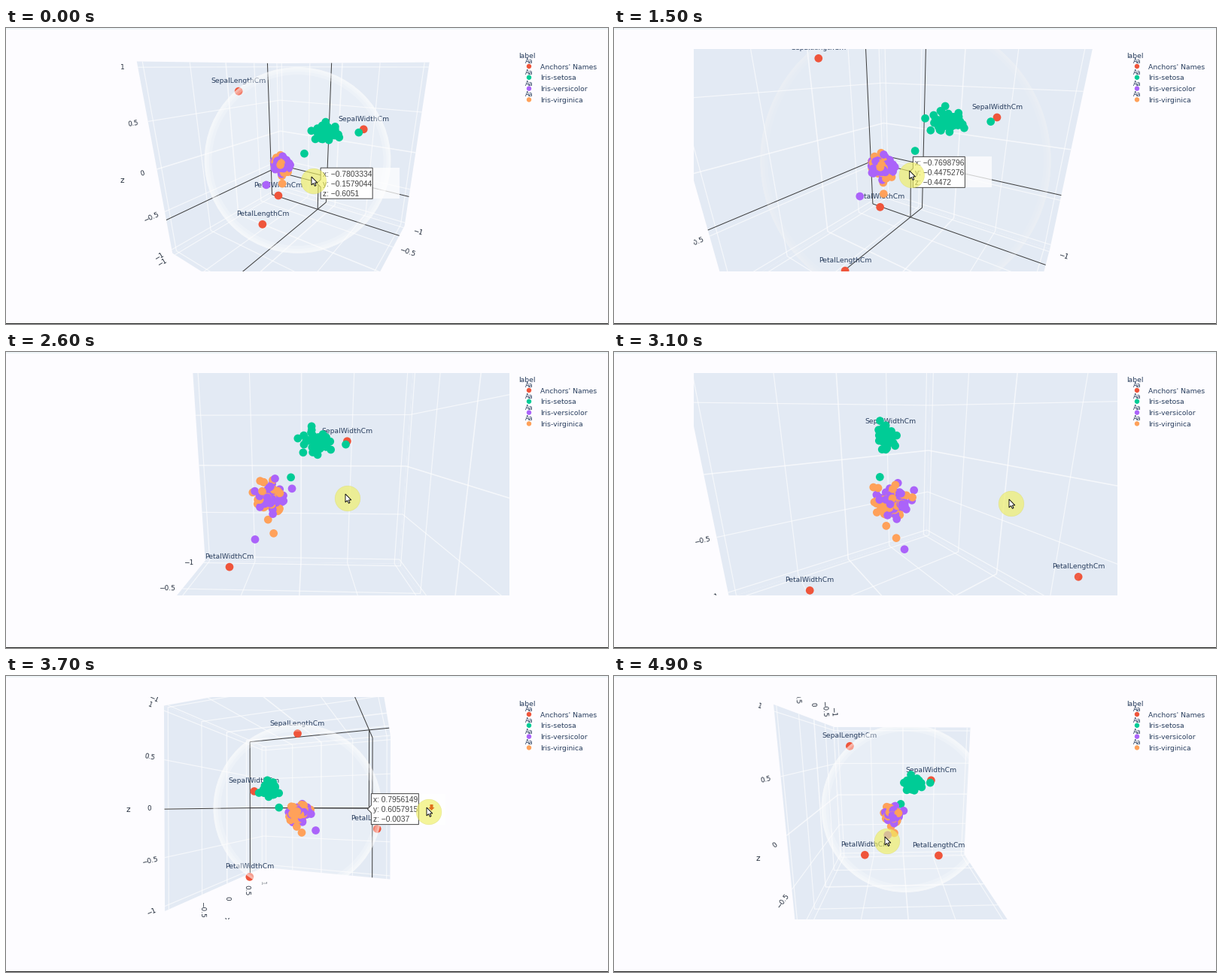
A matplotlib script that plays this animation: 800x394 px, repeating every 5 s.

```python
import numpy as np
import matplotlib.pyplot as plt
from matplotlib.animation import FuncAnimation
from matplotlib.patches import Circle, Polygon, Rectangle

W, H, DPI = 800, 394, 100
STEP, FRAMES = 100, 50
PX = 72 / DPI                       # points per pixel
LEFT, RIGHT, TOP, BOTTOM = 106, 669, 28, 323.5
CENTER = np.array([387.5, 176])
FOCAL, LIM = 357, 1.05
BG, WALL, INK, SPIKE = "#fdfcff", "#e3eaf4", "#2a3f5f", "#3c3c3c"
RED, GREEN, PURPLE, ORANGE = "#EF553B", "#00CC96", "#AB63FA", "#FFA15A"
SANS = "DejaVu Sans"
TICKS = np.linspace(-1, 1, 5)

# The camera zooms in, rests, zooms on, then is dragged around.
TIMES = [0, 600, 1300, 2000, 2600, 3100, 3700, 4300, 4900]
STAGES = [0, 1, 1, 2, 3, 4, 5, 5.07, 6]
AZIMUTH = [34, 34, 34, 2, -34.75, -68.75, -2.25]
ELEVATION = [19.3, 19.3, 19.3, 10.3, 15.5, 0.5, 12.3]
DISTANCE = [3.05, 2.26, 1.7, 1.69, 1.69, 3.34, 3.34]
POINTER = np.array([(409, 204), (392, 188), (405, 216), (454, 195),
                    (528, 202), (562, 181), (363, 220)])
HOVER_STAGES = [0, 1, 2, 5]
HOVERED = np.array([(-0.7803334, -0.1579044, -0.6051), (-0.77779, -0.4797139, -0.4061),
                    (-0.7501037, -0.3670619, -0.5501), (0.7956149, 0.6057915, -0.0037)])


def fibonacci_sphere(n):
    i = np.arange(n) + 0.5
    z = 1 - 2 * i / n
    r, theta = np.sqrt(1 - z * z), np.pi * (1 + 5 ** 0.5) * i
    return np.column_stack([r * np.cos(theta), r * np.sin(theta), z])


ANCHORS = fibonacci_sphere(4)
FEATURES = ["SepalLengthCm", "SepalWidthCm", "PetalLengthCm", "PetalWidthCm"]
rng = np.random.default_rng(4)


def flowers(mean, *strays):
    """Fifty flowers scaled to 0..1 per feature and mapped by RadViz."""
    n = 50 - len(strays)
    noise = 0.6 * rng.normal(size=(n, 1)) + 0.8 * rng.normal(size=(n, 4))
    spread = 0.02 + 0.18 * np.array(mean)
    values = np.vstack([mean + spread * np.clip(noise, -1.7, 1.9), *strays])
    weights = np.clip(values, 0.004, 1)
    return weights @ ANCHORS / weights.sum(axis=1, keepdims=True)


SETOSA = flowers([0.2, 0.6, 0.08, 0.06], [0, 0.42, 0.02, 0], [0.06, 0.12, 0.05, 0.08])
VERSICOLOR = flowers([0.45, 0.32, 0.55, 0.51], [0.19, 0, 0.42, 0.38])
VIRGINICA = flowers([0.64, 0.41, 0.77, 0.8], [0.17, 0.21, 0.59, 0.67])
POINTS = np.vstack([ANCHORS, SETOSA, VERSICOLOR, VIRGINICA])
COLORS = np.array([RED] * 4 + [GREEN] * 50 + [PURPLE] * 50 + [ORANGE] * 50)


def project(points, cam):
    azim, elev, dist = cam
    x, y, z = np.atleast_2d(np.asarray(points, float)).T
    ca, sa, ce, se = np.cos(azim), np.sin(azim), np.cos(elev), np.sin(elev)
    ahead = ca * x + sa * y
    depth = np.maximum(dist - ahead * ce - z * se, 0.05)
    scale = FOCAL / depth
    right, up = ca * y - sa * x, z * ce - ahead * se
    return CENTER + np.column_stack([scale * right, -scale * up]), depth


def blend(stage, values, stages=range(7)):
    columns = np.array(values, float).reshape(len(values), -1).T
    return np.array([np.interp(stage, stages, col) for col in columns])


def at(**coords):
    return np.array([coords.get(k, 0.0) for k in "xyz"])


fig = plt.figure(figsize=(W / DPI, H / DPI), dpi=DPI, facecolor=BG)


def pixel_axes(x0, x1, y0, y1, zorder):
    ax = fig.add_axes([x0 / W, 1 - y1 / H, (x1 - x0) / W, (y1 - y0) / H], zorder=zorder)
    ax.set(xlim=(x0, x1), ylim=(y1, y0))
    ax.axis("off")
    return ax


scene = pixel_axes(LEFT, RIGHT, TOP, BOTTOM, 1)
top = pixel_axes(0, W, 0, H, 2)
live = []


def keep(artist):
    live.append(artist)
    return artist


def write(ax, x, y, text, size=9.25, **style):
    style = {"ha": "center", "va": "center_baseline", "color": INK,
             "family": SANS, "clip_on": True, **style}
    return ax.text(x, y, text, fontsize=size * PX, **style)


def line(ends, cam, color, width, zorder, alpha=1):
    xy, _ = project(ends, cam)
    keep(scene.plot(xy[:, 0], xy[:, 1], color=color, lw=width * PX,
                    alpha=alpha, zorder=zorder, solid_capstyle="butt")[0])


def draw_legend():
    write(top, 681, 36, "label", ha="left")
    names = ["Anchors' Names", "Iris-setosa", "Iris-versicolor", "Iris-virginica"]
    for row, (color, name) in enumerate(zip([RED, GREEN, PURPLE, ORANGE], names)):
        y = 51 + 14.8 * row
        write(top, 695, y - 7.5, "Aa", 8)
        top.add_patch(Circle((695, y), 3.2, fc=color, lw=0))
        write(top, 710.5, y, name, ha="left")
    top.add_patch(Rectangle((0, 0), W, 2, fc="#eef5f8", lw=0))
    top.add_patch(Rectangle((0, 392.6), W, 1.4, fc="#222222", lw=0))


def wall_line(foot, free, cam, *style):
    """A line across a whole wall, through foot along the free axis."""
    ends = np.array([foot, foot], float)
    ends[:, free] = -LIM, LIM
    line(ends, cam, *style)


def draw_walls(walls, cam):
    for axis, level in enumerate(walls):
        u, v = [i for i in range(3) if i != axis]
        corners = np.full((4, 3), float(level))
        corners[:, u] = LIM * np.array([-1, 1, 1, -1])
        corners[:, v] = LIM * np.array([-1, -1, 1, 1])
        keep(scene.add_patch(Polygon(project(corners, cam)[0], fc=WALL, lw=0, zorder=1)))
        for tick in TICKS:
            for fixed, free in ((u, v), (v, u)):
                foot = np.full(3, float(level))
                foot[fixed] = tick
                wall_line(foot, free, cam, "white", 1.6 if tick == 0 else 1.2, 2, 0.65)


def draw_axis(name, base, outward, cam):
    def outside(foot, gap):
        start, end = project([foot, foot + 0.1 * outward], cam)[0]
        direction = (end - start) / np.hypot(*(end - start))
        return start + gap * direction, direction

    for tick in TICKS:
        foot = base.copy()
        foot["xyz".index(name)] = tick
        (x, y), (dx, dy) = outside(foot, 20)
        angle = (np.degrees(np.arctan2(-dy, dx)) + 110) % 180 - 110
        label = f"{tick:g}".replace("-", "\u2212")
        keep(write(scene, x, y, label, 9, rotation=angle, va="center",
                   color="#26303f", zorder=4))
    (x, y), _ = outside(base, 48)
    keep(write(scene, x, y, name, 10.5, color="#26303f", zorder=4))


def draw_axes(walls, cam):
    _, wall_y, wall_z = walls
    azim = np.degrees(cam[0])
    if wall_y < 0:
        draw_axis("z", at(x=LIM, y=-LIM), at(x=1), cam)
        if azim < 10:
            draw_axis("x", at(y=-LIM, z=LIM), at(z=1), cam)
        else:
            draw_axis("x", at(y=LIM, z=-LIM), at(y=1), cam)
    else:
        if azim < -10:
            draw_axis("z", at(x=-LIM, y=-LIM), at(y=-1), cam)
        draw_axis("x", at(y=-LIM, z=wall_z), at(y=-1), cam)
    if wall_z > 0:
        draw_axis("y", at(x=-LIM, z=-LIM), at(z=-1), cam)
    else:
        draw_axis("y", at(x=LIM, z=-LIM), at(x=1), cam)


def draw_sphere(dist):
    radius = FOCAL / np.sqrt(dist ** 2 - 1)
    strength = np.clip((dist - 1.6) / 1.4, 0.1, 1)
    keep(scene.add_patch(Circle(CENTER, radius, fc="white", lw=0,
                                alpha=0.2 * strength, zorder=3)))
    for width in (3, 6, 10):
        keep(scene.add_patch(Circle(CENTER, radius - width / 2, fill=False, ec="white",
                                    lw=width * PX, alpha=0.25 * strength, zorder=8)))


def draw_spikes(spot, walls, cam):
    for axis, level in enumerate(walls):
        foot = spot.copy()
        foot[axis] = level
        line([spot, foot], cam, SPIKE, 1, 5)
        for free in range(3):
            if free != axis:
                wall_line(foot, free, cam, SPIKE, 1, 5)


def number(value, digits):
    return f"{value:.{digits}f}".rstrip("0").replace("-", "\u2212")


def draw_hover(spot, cam):
    x, y = project(spot, cam)[0][0] + (-2, 1)
    width, half = (69 if spot[0] < 0 else 63), 20.5
    x0, x1 = x + 5, x + 5 + width
    keep(top.add_patch(Rectangle((x1, y - half), 36, 2 * half, fc="white",
                                 lw=0, alpha=0.75, zorder=5)))
    shape = [(x, y), (x0, y - 5), (x0, y - half), (x1, y - half),
             (x1, y + half), (x0, y + half), (x0, y + 5)]
    keep(top.add_patch(Polygon(shape, fc="white", ec="#444444", lw=PX, zorder=6)))
    for row, (name, value, digits) in enumerate(zip("xyz", spot, (7, 7, 4))):
        keep(write(top, x0 + 2.5, y + 13 * (row - 1), f"{name}: {number(value, digits)}",
                   10.3, ha="left", family="Liberation Sans", color="#444444", zorder=7))


def draw_pointer(x, y):
    keep(top.add_patch(Circle((x, y), 16.8, fc="#f0ef62", ec="#dede70",
                              lw=0.6 * PX, alpha=0.65, zorder=8)))
    arrow = np.array([(0, 0), (0, 11), (2.6, 8.6), (4.4, 12.4),
                      (6, 11.6), (4.4, 8), (7.8, 8)]) + (x - 3, y - 6)
    keep(top.add_patch(Polygon(arrow, fc="white", ec="black", lw=0.9 * PX, zorder=10)))


def draw_drop_mark(x, y):
    mark = np.array([(-2, -4), (2, -4), (2, 0), (4, 0), (0, 4), (-4, 0), (-2, 0)])
    keep(top.add_patch(Polygon(mark + (x, y), fc="#e0701c", lw=0, zorder=9)))


def draw_points(cam):
    xy, depth = project(POINTS, cam)
    order = np.argsort(-depth)
    keep(scene.scatter(*xy[order].T, s=(10.7 * PX) ** 2, c=COLORS[order], lw=0, zorder=7))
    for (x, y), name in zip(xy, FEATURES):
        if TOP < y < BOTTOM:
            keep(write(scene, x, y - 14.5, name, zorder=6))


def update(frame):
    while live:
        live.pop().remove()
    stage = np.interp(frame * STEP, TIMES, STAGES)
    azim, elev, dist = blend(stage, np.column_stack([AZIMUTH, ELEVATION, DISTANCE]))
    px, py = blend(stage, POINTER)
    cam = np.radians(azim), np.radians(elev), dist
    walls = (-LIM, LIM if 3 <= stage < 6 else -LIM, LIM if elev < 1.5 else -LIM)
    resting = 5 <= stage < 5.1
    draw_walls(walls, cam)
    draw_axes(walls, cam)
    draw_sphere(dist)
    if stage <= 2 or resting:
        spot = blend(min(stage, 5), HOVERED, HOVER_STAGES)
        draw_spikes(spot, walls, cam)
        draw_hover(spot, cam)
    draw_points(cam)
    draw_pointer(px, py)
    if resting:
        draw_drop_mark(px + 3.5, py - 6)
    return live


draw_legend()
anim = FuncAnimation(fig, update, frames=FRAMES, interval=STEP,
                     init_func=lambda: live, repeat=True, repeat_delay=0)
plt.show()
```
